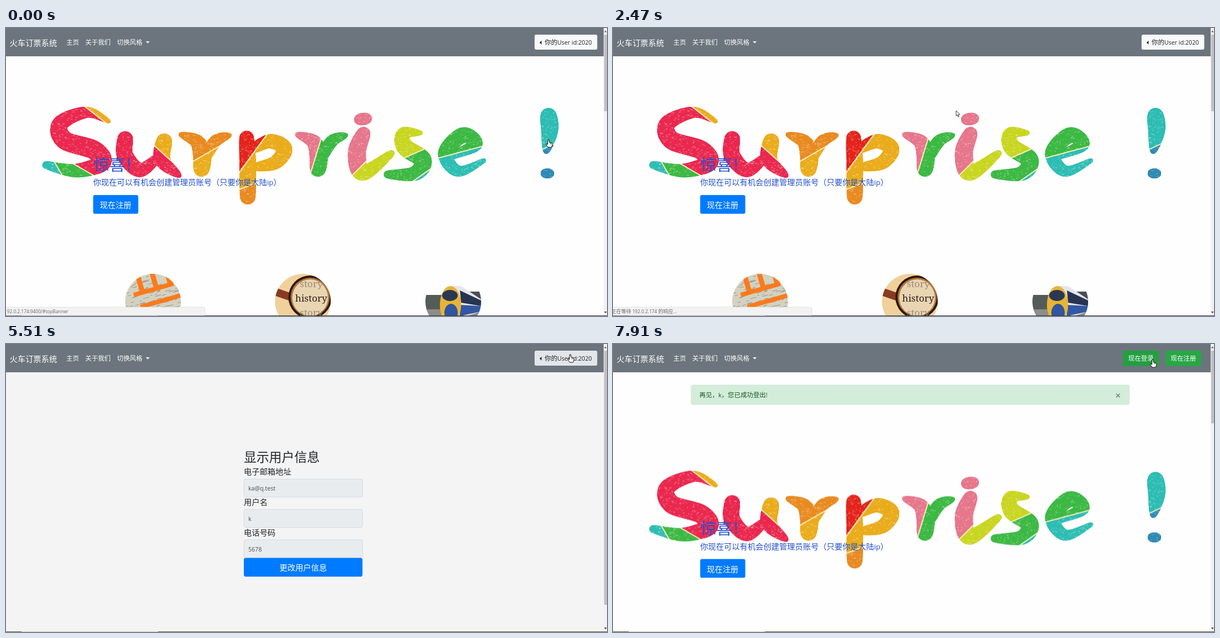
An HTML page with a canvas for the animation above (8000 ms loop, 1079 px wide and 519 px high).

```html
<!DOCTYPE html>
<html lang="zh-CN">
<head>
<meta charset="utf-8">
<title>火车订票系统</title>
<style>
html, body { margin: 0; width: 100%; height: 100%; overflow: hidden; background: #fff; }
canvas { display: block; width: 100vw; height: 100vh; }
</style>
</head>
<body>
<canvas id="stage" width="1079" height="519"></canvas>
<script>
const W = 1079, H = 519, LOOP = 8000, STEP = 76;
const CJK = '"Noto Sans CJK SC", "Noto Sans CJK", sans-serif';
const LATIN = '"Open Sans", "Noto Sans", sans-serif';
const HOST = '192.0.2.174';
const DARK = '#212529', BLUE = '#007bff';
const c = document.getElementById('stage').getContext('2d');

const layer = () => {
  const el = document.createElement('canvas');
  el.width = W; el.height = H;
  return el.getContext('2d');
};
let seed = 7;
const rnd = (a, b) => a + (b - a) * (seed = seed * 16807 % 2147483647) / 2147483647;

// ---------- basic shapes ----------
function rect(g, x, y, w, h, fill) {
  g.fillStyle = fill;
  g.fillRect(x, y, w, h);
}
function box(x, y, w, h, r, fill, line) {
  c.beginPath();
  c.roundRect(x, y, w, h, r);
  c.fillStyle = fill;
  c.fill();
  if (line) { c.strokeStyle = line; c.lineWidth = 0.8; c.stroke(); }
}
function oval(g, x, y, rx, ry, fill) {
  g.beginPath();
  g.ellipse(x, y, rx, ry, 0, 0, 7);
  g.fillStyle = fill;
  g.fill();
}
function shape(g, d, fill, line, width = 1) {
  const p = new Path2D(d);
  if (fill) { g.fillStyle = fill; g.fill(p); }
  if (line) { g.strokeStyle = line; g.lineWidth = width; g.stroke(p); }
}
// Text centred vertically on cy; Latin runs are set slightly smaller
function text(str, x, cy, size, color, weight = 400) {
  c.fillStyle = color;
  for (const run of str.match(/[\x00-\x7f]+|[^\x00-\x7f]+/g)) {
    const latin = run.charCodeAt(0) < 128;
    c.font = latin ? `${weight} ${size * 0.93}px ${LATIN}` : `${weight} ${size}px ${CJK}`;
    c.fillText(run, x, cy + size * 0.38);
    x += c.measureText(run).width;
  }
}

// ---------- painted lettering ----------
// Spline through [x, y] points; radius runs from r0 over r1 to r2
function brush(g, [r0, r1, r2], ...pts) {
  const n = pts.length - 1;
  const at = i => pts[Math.max(0, Math.min(n, i))];
  for (let s = 0; s <= n * 24; s++) {
    const i = Math.min(n - 1, Math.floor(s / 24)), t = s / 24 - i, u = s / 24 / n;
    const [x, y] = [0, 1].map(d => {
      const [a, b, e, f] = [-1, 0, 1, 2].map(k => at(i + k)[d]);
      return b + t / 2 * (e - a + t * (2 * a - 5 * b + 4 * e - f + t * (3 * (b - e) + f - a)));
    });
    const r = r0 * (1 - u) * (1 - 2 * u) + 4 * r1 * u * (1 - u) + r2 * u * (2 * u - 1);
    oval(g, x, y, r, r, g.fillStyle);
  }
}
// Recolours everything beyond a slanted line and leaves a pale seam
function cut(g, color, x, y, deg) {
  g.save();
  g.translate(x, y);
  g.rotate(deg * Math.PI / 180);
  rect(g, -400, 0, 800, 400, color);
  rect(g, -400, -1, 800, 2, '#fbeebc');
  g.restore();
}
function paintLettering() {
  const art = layer();
  const red = '#ea2850', pink = '#e6768c', orange = '#e88a20', amber = '#eaac1c',
    lime = '#c8d620', green = '#3cb944', teal = '#2cbdb4', blue = '#2f8ab4';
  const letter = (base, strokes, cuts) => {
    const g = layer();
    g.fillStyle = base;
    strokes.forEach(s => brush(g, ...s));
    g.globalCompositeOperation = 'source-atop';
    cuts.forEach(k => cut(g, ...k));
    art.drawImage(g.canvas, 0, 0);
  };
  const r = (x, base, cuts) => letter(base, [
    [[4, 15, 14], [x, 192], [x + 29, 205], [x + 38, 230], [x + 37, 254]],
    [[8, 11, 3], [x + 43, 236], [x + 62, 204], [x + 88, 193]]], cuts);

  letter(red,
    [[[4, 17, 7], [184, 168], [145, 152], [98, 172], [105, 202], [158, 220], [172, 243], [125, 257], [72, 247]]],
    [[green, 130, 250, 30], [teal, 92, 250, 60], [amber, 160, 156, 218]]);
  letter(red,
    [[[14, 14, 8], [214, 200], [214, 230], [240, 256], [270, 236]],
     [[14, 14, 4], [284, 204], [281, 238], [311, 266]]],
    [[amber, 275, 220, 222]]);
  r(314, amber, [[orange, 345, 235, 150]]);
  letter(amber,
    [[[13, 15, 14], [432, 198], [434, 245], [434, 304]],
     [[9, 14, 8], [446, 216], [475, 204], [500, 218], [484, 242], [452, 250]]],
    [['#e4241c', 435, 238, 126], [orange, 435, 285, -20]]);
  r(523, green, [[pink, 558, 225, 107]]);
  letter(pink,
    [[[9, 11, 9], [634, 165], [648, 163]],
     [[12, 16, 6], [642, 190], [630, 225], [641, 261], [692, 226]]],
    [[lime, 635, 252, -45]]);
  letter(lime,
    [[[4, 16, 7], [744, 189], [714, 190], [716, 214], [748, 238], [734, 262], [685, 264]]],
    [[green, 720, 232, -24], [teal, 745, 266, -35]]);
  letter(green,
    [[[7, 14, 4], [800, 230], [843, 210], [820, 193], [789, 226], [812, 258], [858, 239]]],
    [[teal, 815, 224, -15]]);
  letter(teal,
    [[[14, 15, 5], [974, 158], [976, 185], [970, 222]], [[7, 9, 7], [967, 262], [977, 262]]],
    [[blue, 975, 213, -25]]);

  art.globalCompositeOperation = 'source-atop';
  for (let i = 0; i < 6500; i++) {
    rect(art, rnd(60, 1000), rnd(138, 323), rnd(1, 4), rnd(1, 2), `rgba(255,250,225,${rnd(0.1, 0.4)})`);
  }
  return art.canvas;
}

// ---------- round pictures ----------
function disc(g, x, fill, draw) {
  g.save();
  g.translate(x, 493);
  g.beginPath();
  g.arc(0, 0, 50, 0, 7);
  g.clip();
  rect(g, -50, -50, 100, 100, fill);
  draw();
  g.restore();
}
function paintPictures() {
  const g = layer();
  disc(g, 264, '#d3d1c0', () => {
    g.rotate(-0.28);
    for (let i = 0; i < 110; i++) rect(g, rnd(-50, 45), rnd(-50, 40), rnd(3, 11), 1, '#98968a');
    for (let i = 0; i < 3; i++) {
      rect(g, -30 + i * 6, -25 + i * 24, 74, 8, '#fb7a1c');
      rect(g, -18 + i * 26, -50, 9, 26, '#fb7a1c');
    }
  });
  disc(g, 533, '#f0d19c', () => {
    shape(g, 'M-50-18L-16-6', null, '#8a3a22', 14);
    oval(g, 13, -8, 39, 39, '#2c1a12');
    oval(g, 13, -8, 35, 35, '#b5793a');
    oval(g, 13, -7, 32, 33, '#ead5b2');
    g.textAlign = 'center';
    g.font = '17px "Noto Serif", "Liberation Serif", serif';
    for (let i = -1; i < 2; i++) {
      g.fillStyle = i ? '#9c8a74' : '#2b1d16';
      g.fillText(i ? 'story' : 'history', 15, i * 26);
    }
  });
  disc(g, 803, '#fefefe', () => {
    rect(g, -50, -12, 34, 30, '#545c5a');
    rect(g, 24, -18, 30, 40, '#4b4f55');
    rect(g, -50, 14, 100, 20, '#8f8d8a');
    shape(g, 'M-6-28H14L50-4V18L12 30Z', '#e4e6ea');
    shape(g, 'M12-20L50-2V8L14 2Z', '#283450');
    shape(g, 'M12 6L50 8V18L12 26Z', '#3258a4');
    oval(g, -5, 6, 19, 34, '#e8b436');
    oval(g, -6, -11, 14, 10, '#2b3852');
    oval(g, -4, 20, 12, 16, '#31559e');
  });
  return g.canvas;
}
const lettering = paintLettering(), pictures = paintPictures();

// ---------- page parts ----------
function navbar() {
  rect(c, 0, 0, 1073, 51, '#6c757d');
  text('火车订票系统', 6.5, 27, 14.2, '#fff');
  text('主页', 108.3, 26, 11.4, '#fff');
  text('关于我们', 142.3, 26, 11.4, '#fff');
  text('切换风格', 199.3, 26, 11.4, '#fff');
  shape(c, 'M251 24h7l-3.5 3.6Z', '#fff');
}
function userButton(hover, open) {
  if (open) box(946.5, 9.5, 117, 32, 5, 'rgba(248,249,250,.5)');
  box(949, 12, 112.5, 27, 3, open ? '#dae0e5' : hover ? '#e2e6ea' : '#f8f9fa');
  shape(c, 'M961.5 22.8v7l-3.5-3.5Z', DARK);
  text('你的User id:2020', 967, 26, 11.4, DARK);
}
const ITEM_H = 22.5;
const ITEMS = [['用户信息', 18.5], ['我的订单', 41], ['退出登录', 76]];
const overRow = (p, y) => inside(p, 835, y, 112, ITEM_H);
function menu(p) {
  box(835, 12.5, 112.5, 92, 3, '#fff', 'rgba(0,0,0,.2)');
  for (const [label, y] of ITEMS) {
    if (overRow(p, y)) rect(c, 835.5, y, 111.5, ITEM_H, '#f8f9fa');
    text(label, 853, y + ITEM_H / 2, 11.4, DARK);
  }
  rect(c, 835.5, 69.5, 111.5, 1, '#e9ecef');
}
function home(dy) {
  rect(c, 0, 51, 1073, 468, '#fefefe');
  c.drawImage(lettering, 0, dy);
  text('惊喜！', 157, 246 + dy, 28.4, '#2450cf', 300);
  text('你现在可以有机会创建管理员账号（只要你是大陆ip）', 156.5, 278 + dy, 14.2, '#2450cf');
  box(156.5, 301 + dy, 81, 33.8, 3.4, BLUE);
  text('现在注册', 168.5, 318.7 + dy, 14.2, '#fff');
  c.drawImage(pictures, 0, dy);
}
function profile(hover) {
  rect(c, 0, 51, 1073, 468, '#f4f4f4');
  text('显示用户信息', 427, 203, 22.7, DARK);
  [['电子邮箱地址', 'ka@q.test'], ['用户名', 'k'], ['电话号码', '5678']].forEach(([label, value], i) => {
    const y = 243.4 + i * 54.7;
    text(label, 427, y - 13.3, 14.2, DARK);
    box(427.4, y, 212.6, 32.4, 3, '#e9ecef', '#ced4da');
    text(value, 435, y + 16.7, 11.4, '#495057');
  });
  box(427, 385.6, 213, 33.6, 3.4, hover ? '#0069d9' : BLUE);
  text('更改用户信息', 491, 403, 14.2, '#fff');
}
function loggedOut() {
  home(86.5);
  box(140.4, 73.9, 786.6, 35.2, 3, '#d4edda', '#c3e6cb');
  text('再见，k，您已成功登出!', 155, 92, 11.4, '#155724');
  shape(c, 'M903.4 89.5l6.6 6.6m0-6.6l-6.6 6.6', null, '#71827a', 1.5);
}
function loginButtons(hover) {
  ['现在登录', '现在注册'].forEach((label, i) => {
    const x = 915.5 + i * 76.3;
    box(x, 11.8, 64.5, 28, 3, hover && !i ? '#249f42' : '#28a745');
    text(label, x + 9.5, 26, 11.4, '#fff');
  });
}
function scrollbar(end) {
  rect(c, 1073, 0, 6, H, '#f1f1f1');
  rect(c, 1073.8, 12, 5.2, end - 12, '#c1c1c1');
  shape(c, 'M1073.8 7.5h4.8l-2.4-3Z', '#606060');
  shape(c, 'M1073.8 511h4.8l-2.4 3Z', '#404040');
}
function taskbar(late) {
  rect(c, 0, 518, W, 1, late ? '#5c5634' : '#34373a');
  rect(c, 28, 518, 245, 1, late ? '#c9c8bd' : '#85888a');
}
function status(str) {
  box(-4, 503, 361, 15, [0, 3, 0, 0], '#f2f2f2', '#dcdcdc');
  text(str, -3, 510.7, 8.9, '#666');
}
function cursor(p, hand) {
  c.save();
  c.translate(p.x, p.y);
  c.lineJoin = 'round';
  if (hand) {
    shape(c, 'M-1 0H1L1.5 5L6 6.2L7 7.5L6.5 11L5 14H-1L-4.5 9L-4 7.5L-1.5 9Z', '#fff', '#111');
    shape(c, 'M3.2 6v2.5M5 6.5v2', null, '#111', 0.7);
  } else {
    shape(c, 'M0 0V9.5L2.2 7.6L3.7 11L5.2 10.3L3.8 7L6.8 6.8Z', '#fff', '#222', 0.9);
  }
  c.restore();
}

// ---------- motion ----------
const inside = (p, x, y, w, h) => p.x >= x && p.x <= x + w && p.y >= y && p.y <= y + h;
const between = (t, a, b) => t >= a && t < b;
const ease = f => f * f * (3 - 2 * f);

// Pointer moves: start, end, x, y
const MOVES = [
  [70, 740, 1040, 26],
  [1000, 1800, 910, 37],
  [2200, 2420, 616, 149],
  [2510, 3100, 554, 347],
  [3480, 3640, 530, 400],
  [3640, 3930, 492, 325],
  [4000, 4400, 620, 308],
  [4560, 5440, 1013, 19],
  [5720, 6450, 885, 87],
  [6910, 7830, 969, 28]
];
function pointer(t) {
  let x = 974, y = 201;
  for (const [a, b, tx, ty] of MOVES) {
    const f = ease(Math.max(0, Math.min(1, (t - a) / (b - a))));
    x += (tx - x) * f;
    y += (ty - y) * f;
  }
  return { x, y };
}
function draw(t) {
  const p = pointer(t);
  const out = t >= 7140, info = between(t, 2730, 7140);
  const open = between(t, 950, 2040) || between(t, 5700, 6530);
  const overItem = open && ITEMS.some(([, y]) => overRow(p, y));
  const overNext = t < 900 && inside(p, 912, 51, 161, 349);
  const overUser = !out && inside(p, 949, 12, 112, 27);
  const overLogin = out && inside(p, 915, 12, 65, 28);
  const overForm = info && inside(p, 427, 386, 213, 33);

  if (info) profile(overForm);
  else if (out) loggedOut();
  else home(0);
  navbar();
  if (out) loginButtons(overLogin);
  else userButton(overUser, open);
  if (open) menu(p);
  scrollbar(info ? 470 : out ? 143 : 150);
  taskbar(t > 4900);

  if (overNext) status(HOST + ':9400/#topBanner');
  else if (overItem) status(HOST + ':9400/' + (info ? 'leave' : 'profile'));
  else if (between(t, 2200, 2730) || between(t, 6910, 7750)) status('正在等待 ' + HOST + ' 的响应...');

  cursor(p, overNext || overItem || overUser || overLogin || overForm);
}
const start = performance.now();
function tick() {
  const t = (performance.now() - start) % LOOP;
  draw(Math.floor(t / STEP) * STEP);
  requestAnimationFrame(tick);
}
tick();
</script>
</body>
</html>
```
